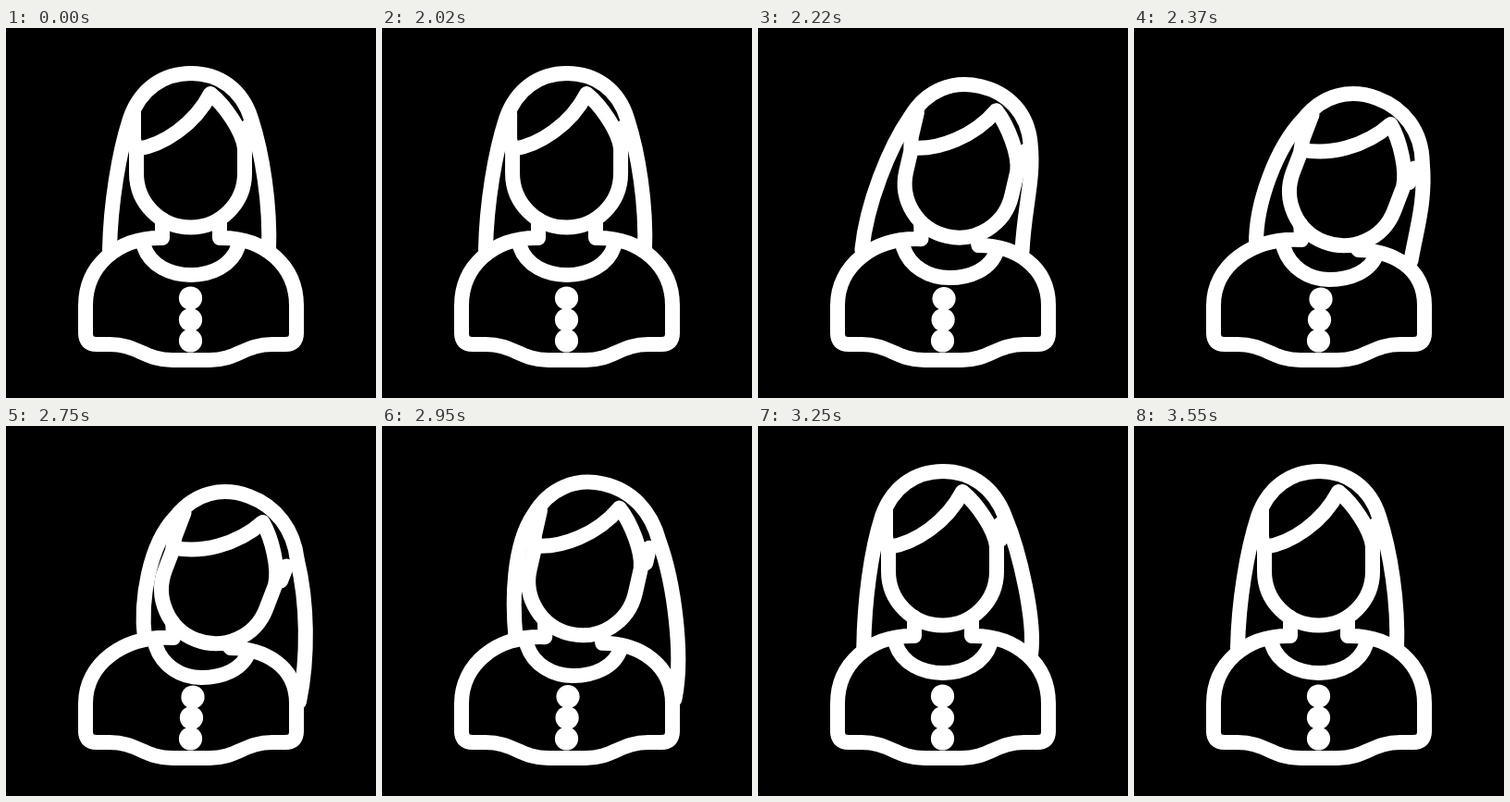
Write an HTML page that moves like this. It is 400 px wide and 400 px high and loops after 3.57 s.

```html
<!DOCTYPE html>
<html lang="en">
<head>
<meta charset="utf-8">
<title>Head tilt</title>
<style>
  html, body { margin: 0; width: 100%; height: 100%; overflow: hidden; background: #000; }
  svg { display: block; width: 100%; height: 100%; }
  path { fill: none; stroke: #fff; stroke-width: 16; stroke-linecap: round; stroke-linejoin: round; }
  circle { fill: #fff; }
</style>
</head>
<body>
<svg viewBox="0 0 400 400">
  <path id="hair"/>
  <g id="head">
    <path d="M138 92V120L141 135V157A58.5 58.5 0 0 0 258 157V130C256 112 237 84 221 71C204 104 170 127 141 131M262 106V123"/>
  </g>
  <path id="body"/>
  <path id="collar"/>
  <circle id="top" r="12.6"/>
  <circle id="mid" r="12.6"/>
  <circle cx="199.5" cy="338" r="12.6"/>
</svg>
<script>
const LOOP = 3570, TILT = 21, PIVOT = [160, 240];
const $ = id => document.getElementById(id);
const hair = $('hair'), head = $('head'), body = $('body'), collar = $('collar');

const ease = (t, a, b) => {
  const p = Math.min(1, Math.max(0, (t - a) / (b - a)));
  return (1 - Math.cos(Math.PI * p)) / 2;
};
// Rises from 0 to 1 over a..b and falls back over c..d
const swing = (t, a, b, c, d) => ease(t, a, b) - ease(t, c, d);
const add = ([x, y], dx, dy, k = 1) => [x + dx * k, y + dy * k];
const turn = ([x, y], deg) => {
  const r = deg * Math.PI / 180, c = Math.cos(r), s = Math.sin(r);
  const dx = x - PIVOT[0], dy = y - PIVOT[1];
  return add(PIVOT, dx * c - dy * s, dx * s + dy * c);
};
const move = p => 'M' + p;
const line = p => 'L' + p;
const curve = (...pts) => 'C' + pts.join(' ');

function drawHair(t, k, angle) {
  const at = (x, y, lag = 0) => add(turn([x, y], angle), -lag, 0, k);
  const left = swing(t, 2200, 2530, 2830, 3330);
  const bend = swing(t, 2100, 2600, 2830, 3330);
  const right = swing(t, 2160, 2600, 2900, 3480);
  hair.setAttribute('d',
    move([112 + 38 * left, 240 - 10 * left]) +
    curve([113 + 32 * bend, 190], at(122, 135, 8), at(134, 98, 3)) +
    curve(at(145, 66, 4), at(170, 49, 4), at(200, 49, 3)) +
    curve(at(230, 49, 2), at(255, 66), add(at(265, 98), 6, 0, right)) +
    curve(add(at(277, 135), 19, 6, right), [286 + 41 * right, 190 + 60 * right],
      [284 + 33 * right, 241 + 57 * right ** 2.2]));
}

function drawBody(k, angle) {
  const neckL = add([169, 227], 12, 2, k), neckR = add([231, 227], 12, 13, k);
  body.setAttribute('d',
    move(turn([169, 207], angle)) + line(neckL) +
    curve(add([120, 226], 6, 0, k), [86, 258], [86, 300]) +
    'V330Q86 342 98 342H112C142 342 150 359 180 359' +
    'H220C250 359 258 342 288 342H302Q314 342 314 330V300' +
    curve([314, 258], add([280, 226], -2, 15, k), neckR) +
    line(turn([231, 207], angle)));

  const l = add([149, 236], 13, 2, k), b = add([200, 267], 11, 5, k), r = add([251, 236], 12, 7, k);
  collar.setAttribute('d', move(l) +
    curve(add(l, 7, 21), add(b, -22, 0), b) +
    curve(add(b, 22, 0), add(r, -7, 21), r));
}

function place(id, [x, y]) {
  $(id).setAttribute('cx', x);
  $(id).setAttribute('cy', y);
}

function draw() {
  const t = performance.now() % LOOP;
  const k = swing(t, 2010, 2375, 2750, 3215), angle = TILT * k;
  head.setAttribute('transform', `rotate(${angle} ${PIVOT})`);
  drawHair(t, k, angle);
  drawBody(k, angle);
  place('top', add([199.5, 292], 2.5, 1, k));
  place('mid', add([199.5, 315.5], 1, 0, k));
  requestAnimationFrame(draw);
}
draw();
</script>
</body>
</html>
```
